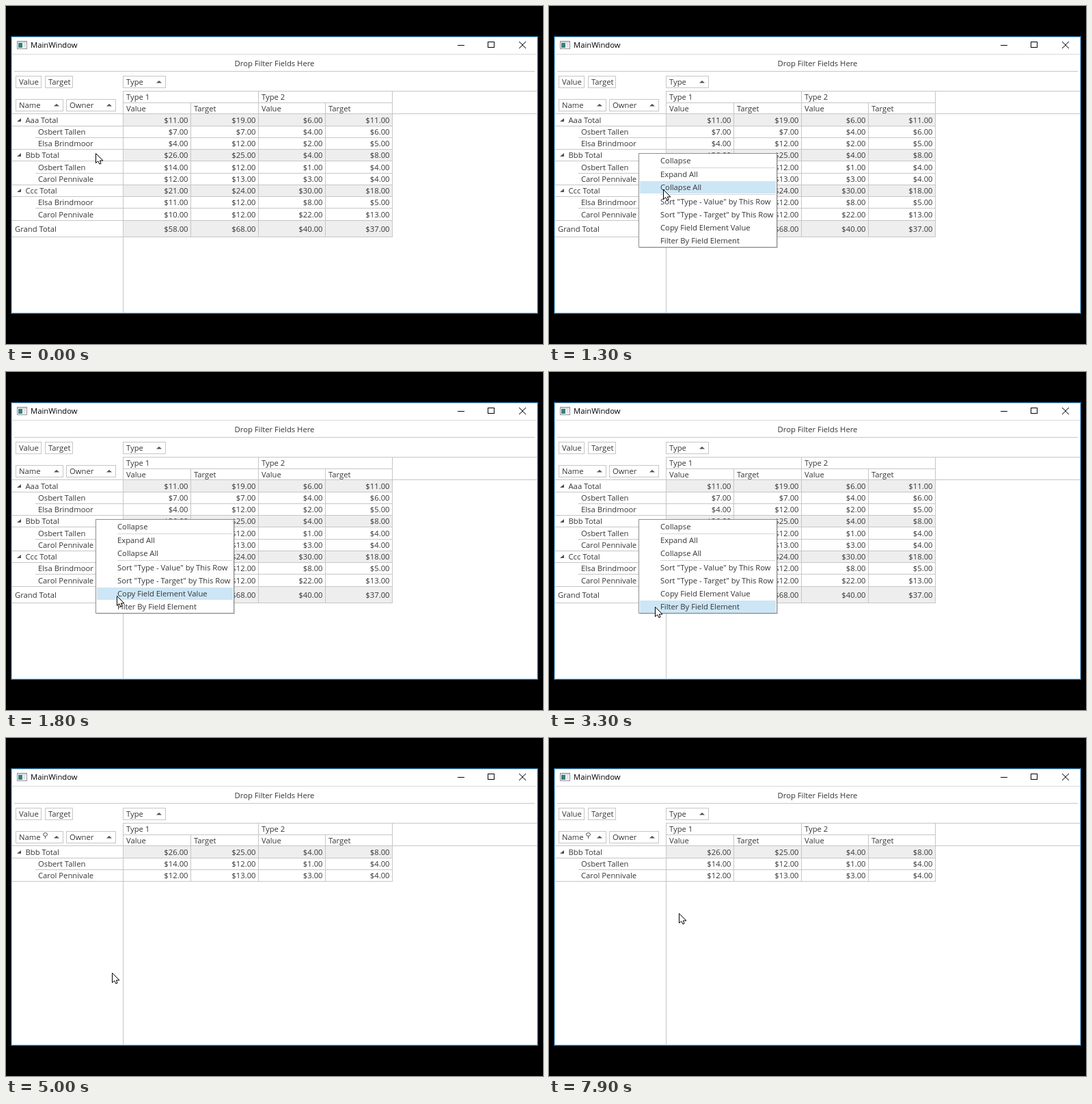
Animation, 786 px wide and 494 px high, one loop 8 s. Source, as an HTML page with a canvas:

```html
<!DOCTYPE html>
<html lang="en">
<head>
<meta charset="utf-8">
<title>Pivot grid</title>
<style>
  html, body { margin: 0; width: 100%; height: 100%; overflow: hidden; background: #000; }
  canvas { display: block; }
</style>
</head>
<body>
<canvas id="stage" width="786" height="494"></canvas>
<script>
const ctx = document.getElementById('stage').getContext('2d');
const LOOP = 8000, STEP = 100;
const ASPECT = 1.14;
const LINE = '#c6c6c6', INK = '#363636', MARK = '#505050', SHADE = '#eeeeee';
const LEFT = 8, TOP = 157.9, ROW = 17.25;
const COLS = [171, 270, 369, 467, 565];

const GROUPS = [
  { name: 'Aaa', rows: [['Osbert Tallen', 7, 7, 4, 6], ['Elsa Brindmoor', 4, 12, 2, 5]] },
  { name: 'Bbb', rows: [['Osbert Tallen', 14, 12, 1, 4], ['Carol Pennivale', 12, 13, 3, 4]] },
  { name: 'Ccc', rows: [['Elsa Brindmoor', 11, 12, 8, 5], ['Carol Pennivale', 10, 12, 22, 13]] }
];

// Label and vertical centre of each menu entry
const MENU = [
  ['Collapse', 226], ['Expand All', 246], ['Collapse All', 265],
  ['Sort "Type - Value" by This Row', 286], ['Sort "Type - Target" by This Row', 305],
  ['Copy Field Element Value', 324], ['Filter By Field Element', 343]
];

// Pointer path: time, x, y
const PATH = [
  [0, 131, 215], [900, 131, 215], [1000, 134, 219], [1100, 146, 233], [1200, 159, 252],
  [1300, 167, 268], [1400, 170, 282], [1600, 168, 309], [1800, 162, 327],
  [2900, 162, 327], [3000, 161, 331], [3200, 156, 341], [3300, 155, 343],
  [6900, 155, 343], [7000, 153, 335], [7200, 148, 321], [7400, 148, 308],
  [7600, 153, 292], [7800, 164, 272], [7900, 190, 256], [8000, 190, 256]
];

function fill(x, y, w, h, color) {
  ctx.fillStyle = color;
  ctx.fillRect(x, y, w, h);
}

const hline = (x1, x2, y, color = LINE) => fill(x1, y, x2 - x1, 1, color);
const vline = (x, y1, y2, color = LINE) => fill(x, y1, 1, y2 - y1, color);

function frame(x, y, w, h, color) {
  ctx.strokeStyle = color;
  ctx.lineWidth = 1;
  ctx.strokeRect(x + 0.5, y + 0.5, w - 1, h - 1);
}

function text(str, x, mid, align = 'left', color = INK) {
  ctx.save();
  ctx.translate(x, mid + 4);
  ctx.scale(ASPECT, 1);
  ctx.font = '9.9px "Open Sans", "Noto Sans", sans-serif';
  ctx.textAlign = align;
  ctx.fillStyle = color;
  ctx.fillText(str, 0, 0);
  ctx.restore();
}

function poly(points, color, outline) {
  ctx.beginPath();
  points.forEach(([x, y]) => ctx.lineTo(x, y));
  ctx.closePath();
  ctx.fillStyle = color;
  ctx.fill();
  if (outline) {
    ctx.strokeStyle = outline;
    ctx.stroke();
  }
}

function field(label, x, y, w, sortable) {
  frame(x, y, w, 18, LINE);
  text(label, x + 5, y + 9);
  if (sortable) {
    const ax = x + w - 10, ay = y + 10.5;
    poly([[ax - 4, ay], [ax, ay - 3.5], [ax + 4, ay]], MARK);
  }
}

function drawWindow() {
  fill(0, 0, 786, 494, '#000');
  fill(7, 44, 772, 406, '#fff');
  frame(7, 44, 772, 406, '#10507f');
  frame(8, 45, 770, 404, '#a5cdec');

  frame(16, 51, 15, 12, '#8c9399');
  fill(17, 52, 13, 2, '#d5dade');
  fill(18, 54, 6, 7, '#38827c');
  fill(25, 54, 4, 7, '#e6e6e6');
  text('MainWindow', 36, 57, 'left', '#000');

  fill(661, 57, 10, 1, '#000');
  frame(705, 52, 10, 9, '#000');
  ctx.strokeStyle = '#000';
  ctx.beginPath();
  ctx.moveTo(751, 52); ctx.lineTo(761, 62);
  ctx.moveTo(761, 52); ctx.lineTo(751, 62);
  ctx.stroke();
  hline(LEFT, 778, 70, '#d9d9d9');
}

function drawHeader(filtered) {
  text('Drop Filter Fields Here', 393, 84, 'center');
  hline(12, 774, 95);
  field('Value', 14, 102, 38);
  field('Target', 57, 102, 41);
  field('Type', 171, 102, 63, true);
  field('Name', 14, 136, 70, true);
  field('Owner', 88, 136, 73, true);
  if (filtered) drawFunnel(57.5, 138);

  hline(171, 778, 124);
  hline(171, 566, 141);
  hline(LEFT, 778, 157);
  vline(171, 124, 448);
  COLS.slice(1).forEach((x, i) => vline(x, i % 2 ? 124 : 141, 157));
  for (let i = 0; i < 4; i++) {
    if (i % 2 === 0) text('Type ' + (i / 2 + 1), COLS[i] + 5, 133);
    text(i % 2 ? 'Target' : 'Value', COLS[i] + 5, 150);
  }
}

function drawFunnel(x, y) {
  ctx.strokeStyle = MARK;
  ctx.lineWidth = 1;
  ctx.beginPath();
  ctx.ellipse(x, y + 3, 3, 2.4, 0, 0, Math.PI * 2);
  ctx.moveTo(x, y + 5.4);
  ctx.lineTo(x, y + 9);
  ctx.stroke();
}

const sum = rows => [0, 1, 2, 3].map(c => rows.reduce((n, r) => n + r[c + 1], 0));

function drawCells(values, top, bottom, mid, shaded) {
  if (shaded) fill(172, top + 1, 394, bottom - top, SHADE);
  values.forEach((v, c) => {
    text('$' + v + '.00', COLS[c + 1] - 3.5, mid, 'right');
    vline(COLS[c + 1], top, bottom);
  });
}

function drawTable(groups, grand) {
  let n = 0;
  const edge = i => Math.floor(TOP + ROW * i);
  const row = (label, x, values, total, lineX) => {
    const mid = Math.floor(TOP + ROW * n + 9.3);
    const top = edge(n), bottom = edge(++n);
    drawCells(values, top, bottom, mid, total);
    text(label, x, mid);
    if (total) poly([[22, mid - 3], [22, mid + 2], [16, mid + 2]], MARK);
    hline(lineX, 566, bottom);
  };
  groups.forEach(g => {
    row(g.name + ' Total', 28.5, sum(g.rows), true, LEFT);
    g.rows.forEach((r, i) =>
      row(r[0], 47, r.slice(1), false, i < g.rows.length - 1 ? 43 : LEFT));
  });
  if (grand) {
    drawCells(sum(groups.flatMap(g => g.rows)), edge(n), 337, 326, true);
    text('Grand Total', 13, 326);
    hline(LEFT, 566, edge(n));
    hline(LEFT, 566, 337);
  }
  vline(171, 124, 448);
}

function drawMenu([px, py], pressed) {
  fill(133, 217, 202, 137, 'rgba(0,0,0,0.16)');
  fill(131, 215, 203, 138, '#fff');
  frame(131, 215, 203, 138, '#8e8e8e');
  hline(163, 331, 236, '#d4d4d4');
  hline(163, 331, 275, '#d4d4d4');
  MENU.forEach(([label, mid]) => {
    const hover = px > 132 && py >= mid - 9 && py < mid + 9.5;
    if (hover) fill(133, mid - 9, 199, 18, pressed ? '#92c0e0' : '#cde6f5');
    text(label, 163, mid);
  });
}

function pointerAt(t) {
  const i = PATH.findIndex(p => p[0] > t);
  const [t0, x0, y0] = PATH[i - 1], [t1, x1, y1] = PATH[i];
  const k = (t - t0) / (t1 - t0);
  return [x0 + (x1 - x0) * k, y0 + (y1 - y0) * k];
}

function drawPointer([x, y]) {
  const shape = [[0, 0], [0, 14], [3.2, 11.2], [5.4, 15.5], [7.6, 14.6], [5.8, 10.5], [10.5, 10.5]];
  ctx.lineWidth = 1;
  poly(shape.map(([dx, dy]) => [x + dx + 0.5, y + dy + 0.5]), '#fff', '#000');
}

function render(now) {
  const t = Math.floor((now % LOOP) / STEP) * STEP;
  const filtered = t >= 5000;
  const pointer = pointerAt(t);
  drawWindow();
  drawHeader(filtered);
  drawTable(filtered ? [GROUPS[1]] : GROUPS, !filtered);
  if (t >= 200 && t < 4800) drawMenu(pointer, t >= 4500);
  drawPointer(pointer);
}

const start = performance.now();
function tick() {
  render(performance.now() - start);
  requestAnimationFrame(tick);
}
tick();
</script>
</body>
</html>
```
